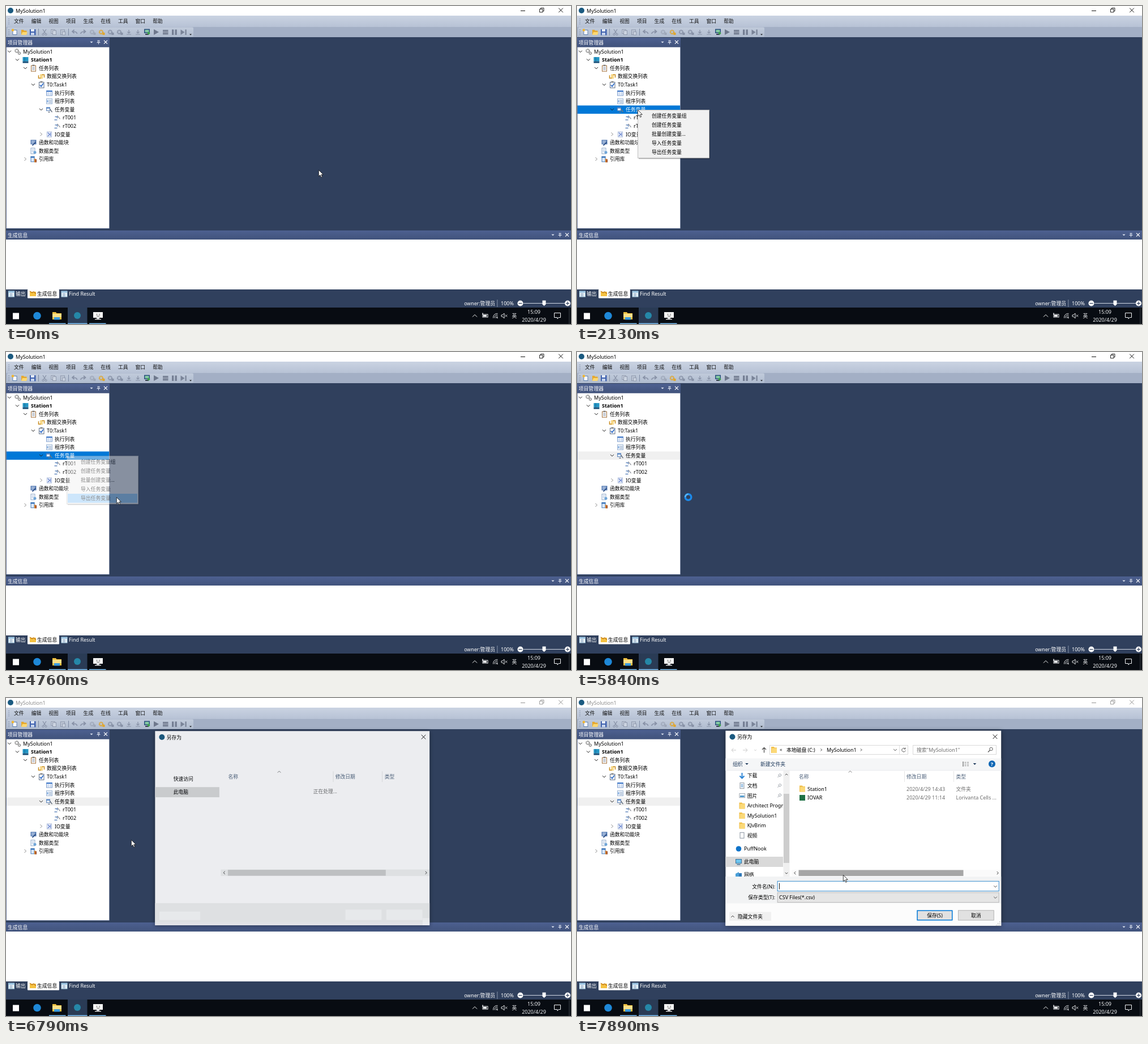
An HTML page for the animation above (7990 ms loop, 998 by 561 pixels).

```html
<!DOCTYPE html>
<html lang="zh-CN">
<head>
<meta charset="utf-8">
<title>MySolution1</title>
<style>
html, body { margin: 0; width: 100%; height: 100%; overflow: hidden; background: #30405d; }
svg { display: block; width: 100%; height: 100%; }
text { font-family: "Noto Sans", "Open Sans", "Noto Sans CJK SC", "Noto Sans CJK", sans-serif; white-space: pre; }
</style>
</head>
<body>
<svg id="stage" viewBox="0 0 998 561" preserveAspectRatio="none"></svg>
<script>
const LOOP = 7990;

// Drawing helpers
const R = (x, y, w, h, fill, more = '') =>
  `<rect x="${x}" y="${y}" width="${w}" height="${h}" fill="${fill}" ${more}/>`;
const box = (x, y, w, h, fill, line, sw = 1) =>
  R(x + sw / 2, y + sw / 2, w - sw, h - sw, fill, `stroke="${line}" stroke-width="${sw}"`);
const C = (x, y, r, fill, more = '') => `<circle cx="${x}" cy="${y}" r="${r}" fill="${fill}" ${more}/>`;
const P = (d, stroke = '#333', w = 1, fill = 'none') =>
  `<path d="${d}" stroke="${stroke}" stroke-width="${w}" fill="${fill}"/>`;
const F = (d, fill) => `<path d="${d}" fill="${fill}"/>`;
const T = (x, y, s, fill = '#000', more = '') =>
  `<text x="${x}" y="${y + 3.3}" font-size="${/^[ -~]+$/.test(s) ? 9 : 8.8}" fill="${fill}" ${more}>${s}</text>`;
const G = (id, body, more = '') => `<g id="${id}" ${more}>${body}</g>`;
const mid = 'text-anchor="middle"', end = 'text-anchor="end"';

const chevron = {
  down: (x, y, c = '#333', s = 3) => P(`M${x - s} ${y - s / 2}l${s} ${s} ${s} ${-s}`, c),
  up: (x, y, c = '#333', s = 3) => P(`M${x - s} ${y + s / 2}l${s} ${-s} ${s} ${s}`, c),
  right: (x, y, c = '#333', s = 3) => P(`M${x - s / 2} ${y - s}l${s} ${s} ${-s} ${s}`, c),
  left: (x, y, c = '#333', s = 3) => P(`M${x + s / 2} ${y - s}l${-s} ${s} ${s} ${s}`, c)
};
const cross = (x, y, s, c, w = 1) =>
  P(`M${x - s} ${y - s}l${2 * s} ${2 * s}M${x + s} ${y - s}l${-2 * s} ${2 * s}`, c, w);
const caretDown = (x, y, c, s = 3) => F(`M${x - s} ${y - s / 2}h${2 * s}l${-s} ${s}z`, c);
const folder = (x, y) => F(`M${x - 5} ${y - 5.5}h5l1 1.5h4v9.5h-10z`, '#f0c04c') +
  R(x - 4, y - 3, 9, 8.5, '#fbd978');
const page = (x, y, c = '#8a94a0') => box(x - 4, y - 5.5, 8, 11, '#fff', c);
const lines = (x, y, w, n, c) => Array.from({ length: n }, (_, i) => R(x, y + i * 2, w, .9, c)).join('');
const pushpin = (x, y, c) => P(`M${x - 2} ${y - 3}h4M${x - 1} ${y - 3}v3.5M${x + 1.2} ${y - 3}v3.5M${x - 3} ${y + .5}h6M${x} ${y + .5}v3`, c, .9);

// Small icons, each around its centre
const icon = {
  gears: (x, y) => C(x - 1.5, y - 1.5, 2.8, 'none', 'stroke="#888" stroke-width="2" stroke-dasharray="1.6 .6"') +
    C(x + 3, y + 2.8, 2, 'none', 'stroke="#777" stroke-width="1.6" stroke-dasharray="1.4 .5"'),
  station: (x, y) => R(x - 5, y - 5, 10, 7.5, '#2496c4') + R(x - 5, y + 2.5, 10, 3, '#174f78') + R(x - 2, y - 5, 1, 8, '#176a9a'),
  list: (x, y) => box(x - 4.5, y - 5, 9, 11, '#fff', '#a4713c') + R(x - 2, y - 6, 4, 2, '#777') + lines(x - 2.5, y - 2, 5, 3, '#8a96a8'),
  swap: (x, y) => R(x - 2.5, y - 4, 5, 8, '#f7d98a') + P(`M${x - 5} ${y - 2}v5h4M${x + 5} ${y + 2}v-5h-4`, '#c98d1f', 1.5),
  task: (x, y) => box(x - 4.5, y - 5, 9.5, 11, '#fff', '#5d6d86') + R(x - 2, y - 6, 4, 2, '#777') + P(`M${x - 2.5} ${y + .5}l2 2.5 4-5.5`, '#1d5fc4', 1.6),
  table: (x, y) => box(x - 5.5, y - 4.5, 11, 9.5, '#f4f8ff', '#7c9ccc') + R(x - 5, y - 4.5, 10, 2.5, '#4a80cc') + P(`M${x - 2} ${y - 2}v6.5M${x + 2} ${y - 2}v6.5M${x - 5} ${y + 1.5}h10`, '#a9bfe0', .7),
  form: (x, y) => box(x - 5.5, y - 5, 11, 10, '#f1f6fd', '#9db4d2') + lines(x - 1, y - 2, 5, 3, '#8fa5c2') + R(x - 4, y - 2, 2, 4, '#7ca8de'),
  vars: (x, y) => box(x - 5.5, y - 4, 7, 6.5, '#e3eefb', '#5f83b5') + R(x - 5.5, y - 4, 7, 2, '#4f7fc0') + P(`M${x - 2} ${y + 4.5}h3M${x + 1} ${y - 1}l4 5.5`, '#6e7784', 1.5),
  tool: (x, y) => P(`M${x - 4} ${y - 2}h4v3M${x - 5} ${y + 3.5}h5`, '#4a76b4', 1.2) + P(`M${x} ${y - 4}l5 6`, '#8b8f98', 1.3),
  io: (x, y) => box(x - 4.5, y - 5, 9, 10, '#f3f6ff', '#a7b8d8') + P(`M${x - 2.5} ${y - 3}l3 3-3 3M${x + 2} ${y - 3}v6`, '#4e6fc2', 1.1),
  func: (x, y) => R(x - 5, y - 5, 10, 8, '#5a7fb5') + lines(x - 3.5, y - 3.5, 6, 3, '#dfe9f7') + P(`M${x - 2} ${y + 5}l6-6`, '#2d4f86', 1.8),
  type: (x, y) => page(x - 1, y, '#8fa9c9') + lines(x - 3, y - 3, 4, 3, '#a5bedd') + C(x + 2.5, y + 2.5, 2.5, '#6fa5d8'),
  lib: (x, y) => box(x - 5, y - 5, 7, 10, '#dceafa', '#4d7db8') + R(x - 5, y - 5, 7, 2.5, '#3f78bb') + R(x + 1.5, y - 1, 2, 6.5, '#d9822b') + R(x + 3.5, y, 2, 5.5, '#9d4a26'),
  result: (x, y) => box(x - 5.5, y - 5.5, 11, 11, '#eef6fb', '#a9d0e6') + R(x - 4.5, y - 4.5, 9, 2, '#7fb2d8') + lines(x - 3, y - 1, 5, 3, '#7b97b8')
};

function titleBar() {
  return R(0, 0, 998, 17, '#fff') + C(8, 8, 5, '#1b5a80') +
    G('title', T(17, 8.5, 'MySolution1') + P('M909 8.5h8', '#111') +
      P('M942.5 5.5h5.5v5.5h-5.5zM944.5 5.5v-2h5.5v5.5h-2', '#111', .9) + cross(980, 7.5, 3.8, '#111'));
}

function menuBar() {
  const names = ['文件', '编辑', '视图', '项目', '生成', '在线', '工具', '窗口', '帮助'];
  return R(0, 17, 998, 20, 'url(#bar)') + [0, 1, 2, 3].map(i => R(4.5, 22 + i * 3, 1.2, 1.2, '#7784a0')).join('') +
    names.map((s, i) => T(14 + i * 30.65, 27, s, '#111')).join('');
}

function toolBar() {
  const g = '#8791a6', y = 46;
  const play = x => F(`M${x - 4} ${y - 5}v10l9-5z`, '#6e788c');
  const gear = (x, c) => C(x - 1, y, 3, 'none', `stroke="${c}" stroke-width="2.4" stroke-dasharray="1.8 .7"`) + R(x + 1.5, y + 1, 4, 4, c);
  const arrow = x => P(`M${x} ${y - 4}v6m-2.5-2.5l2.5 2.5 2.5-2.5M${x - 4} ${y + 4}h8`, g, 1.2);
  return R(0, 37, 998, 18, '#a3afc5') + R(2, 37.5, 329, 17, 'url(#strip)', 'rx="2"') +
    [0, 1, 2, 3].map(i => R(4.5, 41 + i * 3, 1.2, 1.2, '#68758f')).join('') +
    box(11.5, 42, 8, 9, '#fff', '#5e7fae') + C(12, 42.5, 2.2, '#f2b52d') +
    F('M27 42h4l1 1.5h4.5v7h-9.5z', '#e6a92e') + F('M29 46h9l-2 5h-9z', '#fbd873') +
    R(42, 41, 10.5, 10.5, '#3f61ad') + R(44, 41, 6, 4, '#e6eefb') + R(44, 47, 6, 4.5, '#c5d3ec') +
    [57, 110].map(x => R(x, 40, 1, 12, '#7c89a3')).join('') +
    P('M65 41l5 8M71 41l-5 8', g, 1.2) + C(65.5, 50, 1.6, 'none', `stroke="${g}"`) + C(70.5, 50, 1.6, 'none', `stroke="${g}"`) +
    box(79.5, 41, 7, 8, '#c6cedc', g, .8) + box(82, 43, 7, 8, '#ccd4e1', g, .8) +
    box(96, 41.5, 8, 9.5, '#bac3d3', g, .8) + box(99.5, 45, 5.5, 6.5, '#ccd4e1', g, .8) +
    P('M125.5 49q0-4-8-4m3-3l-3.5 3 3.5 3', g, 1.7) + P('M132 49q0-4 8-4m-3-3l3.5 3-3.5 3', g, 1.7) +
    gear(153, '#9ea7b8') + gear(169, '#e0a62b') + gear(185, g) + gear(201, g) + arrow(217) + arrow(233) +
    R(244, 40.5, 10, 7.5, '#2b4e7e') + R(245.5, 42, 7, 4.5, '#83c9a2') + R(246, 49, 6, 2, '#333c4c') + C(252, 48, 2.3, '#3fa04f') +
    play(265) + R(277, 42, 9.5, 8.5, '#7a8498') + R(277, 45.5, 9.5, 1, '#a9b3c4') +
    R(293, 41.5, 3.3, 9.5, '#747e93') + R(298.5, 41.5, 3.3, 9.5, '#747e93') +
    F('M308.5 41.5v9.5l7-4.75z', '#7a8498') + R(316.5, 41.5, 2.2, 9.5, '#7a8498') + caretDown(326, 50.5, '#111', 2);
}

const rows = [
  [30, 'MySolution1', 'gears', 'down'], [44, 'Station1', 'station', 'down'], [58, '任务列表', 'list', 'down'],
  [72, '数据交换列表', 'swap'], [72, 'T0:Task1', 'task', 'down'], [86, '执行列表', 'table'], [86, '程序列表', 'form'],
  [86, '任务变量', 'vars', 'down'], [100, 'rT001', 'tool'], [100, 'rT002', 'tool'], [86, 'IO变量', 'io', 'right'],
  [58, '函数和功能块', 'func'], [58, '数据类型', 'type'], [58, '引用库', 'lib', 'right']
];

function paneHead(y, w, s) {
  return R(0, y, w, 16, 'url(#head)') + T(3, y + 8.3, s, '#fff') +
    caretDown(w - 32, y + 8, '#e6ebf5', 2.6) + pushpin(w - 19.5, y + 8, '#e6ebf5') + cross(w - 7, y + 7.7, 3, '#fff', 1.2);
}

function projectTree() {
  return paneHead(56, 183, '项目管理器') + R(0, 72, 183, 321, '#41537c') + R(.8, 72.7, 181.5, 319.5, '#fff') +
    G('row', R(1, 175.5, 181, 14.6, '#0078d7')) +
    rows.map(([x, s, kind, fold], i) => {
      const y = 80.2 + i * 14.6;
      const more = i === 1 ? 'font-weight="700"' : i === 7 ? 'id="rowText"' : '';
      return (fold ? chevron[fold](x - 24, y, fold === 'down' ? '#222' : '#888') : '') +
        icon[kind](x - 9.5, y + .3) + T(x, y + .1, s, '#000', more);
    }).join('');
}

function lowerPane() {
  return paneHead(396, 998, '生成信息') + R(0, 412, 998, 88, '#fff') + R(0, 500, 998, 32, '#30405d') +
    icon.result(9.5, 508) + T(17, 507.7, '输出', '#fff') + R(38, 500, 56, 15.5, '#fff', 'rx="1"') +
    R(42, 504, 11, 8, '#f5c242') + P('M42 503l4 3 3-2 4 4', '#c17a1d', 1.2) + T(55, 507.7, '生成信息') +
    icon.result(103, 508) + T(111, 507.7, 'Find Result', '#fff') +
    T(864, 525, 'owner:管理员', '#fff', end) + R(867.5, 518, .8, 13, '#9aa6ba') + T(874, 525, '100%', '#fff') +
    R(914, 524, 73, 1, '#cfd6e2') + F('M947.5 519.5h6v7l-3 2.5-3-2.5z', '#fff') +
    C(908.5, 524.5, 5, '#fff') + R(905.5, 524, 6, 1.2, '#30405d') + C(992, 524.5, 5, '#fff') +
    R(989, 524, 6, 1.2, '#30405d') + R(991.4, 521.5, 1.2, 6, '#30405d');
}

function taskBar() {
  const w = '#f2f4f6';
  return R(0, 532, 998, 29, '#080c12') + R(12, 541.5, 11, 11, '#fff') + C(55, 546.5, 6.8, '#1e88d8') +
    F('M82 540h6l1.5 2h8.5v11h-16z', '#f0c040') + R(82, 543, 16, 6, '#fbe08a') + R(85, 549, 10, 4.5, '#3b9be0') +
    R(109, 532, 34.5, 29, '#2a3b55', 'id="appTab"') + C(126, 546, 6, '#2588a8') +
    R(154, 540, 17, 10, '#f4f4f4') + R(160, 550, 5, 2, '#c9cdd2') + R(157, 552, 11, 1.3, '#e5e5e5') +
    C(160.5, 544, .8, '#333') + C(165, 544, .8, '#333') + P('M160 546.5q2.7 2 5.5 0', '#333', .8) +
    [76, 109, 147].map(x => R(x, 559.5, x === 109 ? 34.5 : 29.5, 1.5, '#76b9ed')).join('') +
    chevron.up(828, 546.5, w, 4) +
    box(841.5, 543.5, 10, 6, 'none', w) + R(843, 545, 6, 3, w) + P('M842 541.5v3', w, 1.4) +
    P('M860.5 550.5q0-8 8-8M863 550.5q0-5.5 5.5-5.5M865.5 550.5q0-3 3-3', w, .9) + C(867.8, 550, 1, w) +
    P('M875 545h2l3-3v9l-3-3h-2z', w, .9) + cross(883.5, 546.5, 1.8, w, .9) + T(898, 546.5, '英', w, mid) +
    T(932.5, 539.5, '15:09', w, mid) + T(932.5, 553.3, '2020/4/29', w, mid) +
    P('M968.5 541.5h11v8h-3.5l-2 2.5v-2.5h-5.5z', w) + R(994.5, 533, .8, 28, '#4a4f57');
}

function contextMenu() {
  const names = ['创建任务变量组', '创建任务变量', '批量创建变量...', '导入任务变量', '导出任务变量'];
  return G('menu', R(109, 186, 126, 84, '#000', 'opacity=".28"') + box(107, 183, 127, 85.5, '#f1f1f1', '#b4b4b4', .8) +
    R(109, 250, 123, 16, '#91c9f7', 'id="hover"') +
    names.map((s, i) => T(132, 193.5 + i * 16, s)).join(''));
}

function dialogTree() {
  const items = [['下载', 137], ['文档', 154.7], ['图片', 172.2], ['Architect Progr', 189.9], ['MySolution1', 207.4], ['KJvBrim', 224.9], ['视频', 242.3]];
  const art = y => [
    P(`M291.5 ${y - 5}v9m-4-3.5l4 4 4-4`, '#2f86d6', 2),
    page(291.5, y) + lines(289.5, y - 2.5, 4, 3, '#3d87c9'),
    box(286.5, y - 4, 10.5, 8, '#fff', '#8a94a0', .8) + R(288, y, 7.5, 2.5, '#3d8fc9')
  ];
  const pin = y => P(`M354.5 ${y + 3}l2.5-2.5m-1.5-2l3.5 3.5m-2.5-3.5l2-2 2.5 2.5-2 2`, '#7d858f', .9);
  return `<g clip-path="url(#treeClip)">` + items.map(([s, y], i) =>
    (i < 3 ? art(y)[i] + pin(y) : i < 6 ? folder(291.5, y) : page(291.5, y)) + T(300.7, y, s)).join('') +
    C(285.5, 266, 4.8, '#0f73c9') + T(295, 265.9, 'PuffNook') +
    R(262, 280, 102, 18, '#d9d9d9') + box(280, 284, 11, 8, '#6cc5ef', '#3a6f98') + R(282.5, 293, 6, 1.5, '#3a6f98') + T(295, 289, '此电脑') +
    F('M280 310l6-3v8h-6z', '#4a9fd8') + R(286, 309, 5, 6, '#2f78b8') + T(295, 312, '网络') + '</g>' +
    R(364.5, 128, 11, 187, '#f0f0f0') + R(365, 169, 10, 122, '#cdcdcd') +
    chevron.up(370, 135, '#444', 2.3) + chevron.down(370, 309, '#444', 2.3);
}

function dialog() {
  const head = '#4c607a', dim = '#6d6d6d', ink = '#1e395b', left = 262.4, width = 486.8;
  const frame = R(left, 57.7, width, 344, '#fff', 'style="filter:drop-shadow(0 1px 4px #0007)"') +
    C(274.5, 68.5, 5, '#1b5a80') + T(283, 68.7, '另存为') + cross(738.5, 68.2, 3.8, '#111') +
    chevron.up(482.5, 130, '#777', 2.8) + T(392, 138.3, '名称', head) + T(582, 138.3, '修改日期', head) + T(669.5, 138.3, '类型', head) +
    [578, 665].map(x => R(x, 129, .8, 19, '#dedede')).join('') +
    R(379, 303, 370, 11.5, '#f0f0f0', 'id="track"') + R(391.5, 303.5, 280, 10.5, '#cdcdcd', 'id="thumb"') +
    chevron.left(385, 308.7, '#333', 2.5) + chevron.right(743, 308.7, '#333', 2.5);
  const bare = T(295, 142, '快速访问') + R(left, 157, 114, 18, '#d9d9d9') + T(295, 165.7, '此电脑') +
    R(left, 362.5, width, 39.2, '#f0f0f0') + R(270, 377.5, 72.5, 15, '#fafafa') +
    R(600, 374, 64, 18.5, '#fafafa') + R(672.5, 374, 64, 18.5, '#fafafa') + R(737, 389, 12, 12.7, '#fafafa');
  const nav = P('M281 92h-8m3.5-3.5l-3.5 3.5 3.5 3.5M293 92h8m-3.5-3.5l3.5 3.5-3.5 3.5', '#c9c9c9') +
    chevron.down(315, 92, '#ccc', 1.8) + P('M330.5 96.5v-9m-3.5 3.5l3.5-3.5 3.5 3.5', '#444', 1.2) +
    box(340, 83, 245, 17, '#fff', '#d9d9d9') + folder(348, 91.5) + T(358, 91, '«', '#333') + T(370, 91.3, '本地磁盘 (C:)') +
    chevron.right(431.5, 91.5, '#333', 2) + T(441, 91.3, 'MySolution1') + chevron.right(502, 91.5, '#333', 2) +
    chevron.down(562, 91.5, '#555', 2.8) + R(569, 83, .8, 17, '#d9d9d9') +
    P('M579.5 89.5a3.3 3.3 0 1 0 .8 3M580 87.5v2.5h-2.5', '#555') +
    box(593, 83, 148, 17, '#fff', '#d9d9d9') + T(600, 91.3, '搜索"MySolution1"', dim) +
    C(731.5, 90, 2.7, 'none', 'stroke="#555"') + P('M729.5 92l-3.5 3.5', '#555', 1.2) +
    R(left, 106.5, width, 21.5, '#f5f6f7') + R(left, 127.5, width, .7, '#e4e6e9') + T(275, 116.5, '组织', ink) + caretDown(300, 116.5, ink, 2.8) +
    T(324, 116.5, '新建文件夹', ink) +
    [0, 1, 2].map(i => R(681, 112.5 + i * 3, 2, 2, '#777') + R(684.5, 113 + i * 3, 3, .9, '#777') + R(689, 113 + i * 3, 3, .9, '#777')).join('') +
    caretDown(702.5, 116.5, ink, 2.8) + C(733, 116.3, 6, '#0f67b5') + T(733, 116.5, '?', '#fff', mid + ' font-weight="700"');
  const form = R(left, 315, width, 47.5, '#f2f3f4') + R(left, 362.5, width, 39.2, '#fcfcfc') +
    T(350, 332.3, '文件名(N):', '#000', end) + box(353.7, 322.8, 392, 18.3, '#fff', '#1f7fc8', .9) + R(357, 326.5, .9, 11, '#000') + chevron.down(739, 332.5, '#555', 2.8) +
    T(350, 352, '保存类型(T):', '#000', end) + box(353.7, 342.8, 392, 18.3, '#e5e5e5', '#b3b3b3', .9) + T(357, 352, 'CSV Files(*.csv)') + chevron.down(739, 352, '#555', 2.8) +
    R(269, 377.5, 74, 15.5, '#f0f0f0') + chevron.up(275, 385.5, '#333', 2.7) + T(284, 385.5, '隐藏文件夹') +
    box(600.3, 374.3, 63.2, 18.2, '#e1e1e1', '#0078d7', 1.5) + T(632, 383.3, '保存(S)', '#000', mid) +
    box(673, 374.3, 63.7, 18.2, '#e1e1e1', '#adadad', .9) + T(704.7, 383.3, '取消', '#000', mid) +
    [[746, 394], [743, 397], [746, 397], [740, 400], [743, 400], [746, 400]].map(([x, y]) => R(x, y, 1.4, 1.4, '#b5b5b5')).join('');
  const file = (y, name, date, kind) => T(407, y, name) + T(582, y, date, dim) + T(669.5, y, kind, dim);
  const files = folder(398, 160) + file(160.3, 'Station1', '2020/4/29 14:43', '文件夹') +
    R(393, 171, 10, 10, '#1e7145') + file(175.8, 'IOVAR', '2020/4/29 11:14', 'Lorivanta Cells ...');
  return G('dialog', frame + G('bare', bare) + G('full', nav + dialogTree() + form) +
    G('wait', T(543, 165, '正在处理...', dim)) + G('files', files));
}

const grad = (id, a, b) => `<linearGradient id="${id}" x2="0" y2="1"><stop stop-color="${a}"/><stop offset="1" stop-color="${b}"/></linearGradient>`;
const stage = document.getElementById('stage');
stage.innerHTML = '<defs>' + grad('bar', '#cad3e2', '#b7c2d5') + grad('strip', '#c1cbdb', '#b0bccf') + grad('head', '#4d6090', '#41537c') +
  '<clipPath id="treeClip"><rect x="262.4" y="128" width="101.6" height="187"/></clipPath></defs>' +
  R(0, 0, 998, 561, '#30405d') + titleBar() + menuBar() + toolBar() + projectTree() + lowerPane() + taskBar() +
  contextMenu() + dialog() +
  G('ring', C(0, 0, 5.3, 'none', 'stroke="#1c8aea" stroke-width="3.4"') + P('M-5.3 0A5.3 5.3 0 0 1 0-5.3', '#5cb6f7', 2.4)) +
  G('arrow', P('M.3.3v11.2l2.6-2.4 1.8 4.1 1.9-.8-1.8-4h3.5z', '#111', .8, '#fff'));

const el = Object.fromEntries([...stage.querySelectorAll('[id]')].map(e => [e.id, e]));

// Pointer path: [time, x, y], each held until the next
const path = [[0, 552, 289]];
function move(t0, t1, n, x, y) {
  const [, x0, y0] = path[path.length - 1];
  for (let k = 0; k < n; k++) {
    const p = (k + 1) / n, e = p * p * (3 - 2 * p);
    path.push([t0 + (t1 - t0) * k / (n - 1), x0 + (x - x0) * e, y0 + (y - y0) * e]);
  }
}
move(580, 960, 6, 175, 193);
move(1130, 1510, 6, 107, 183);
move(2970, 3460, 7, 195, 261);
move(3610, 3670, 2, 195, 256);
path.push([5920, 204, 265]);
move(6000, 6300, 4, 221, 250);
move(6880, 6980, 2, 440, 296);
move(7430, 7890, 6, 470, 312);

// Stepped values: [time, value...]
const rowFill = [[0, 'none'], [1970, '#0078d7'], [4950, '#f0f0f0']];
const menuFade = [[0, 0], [2050, .5], [2130, 1], [4760, .45], [4860, 0]];
const dialogPose = [[0, 0, 1], [6630, .3, .965], [6700, .7, .986], [6790, .91, .996], [6880, 1, 1]];
const at = (steps, t) => steps.filter(s => s[0] <= t + .5).pop();
const show = (e, on) => e.setAttribute('display', on ? 'inline' : 'none');

function draw(t) {
  const [, x, y] = at(path, t), [, fill] = at(rowFill, t), [, fade] = at(menuFade, t), [, alpha, scale] = at(dialogPose, t);
  const busy = t >= 5050 && t < 6000, loaded = t >= 7150;
  el.appTab.setAttribute('fill', t < 70 ? '#2e415d' : '#2a3b55');
  el.title.setAttribute('opacity', t < 5920 ? 1 : .45);
  el.row.firstChild.setAttribute('fill', fill);
  el.rowText.setAttribute('fill', fill === '#0078d7' ? '#fff' : '#000');

  show(el.menu, fade > 0);
  el.menu.setAttribute('opacity', fade);
  const item = Math.floor((y - 185) / 16);
  show(el.hover, item >= 0 && t > 2900);
  el.hover.setAttribute('y', 186 + Math.min(item, 4) * 16);

  show(el.dialog, alpha > 0);
  el.dialog.setAttribute('opacity', alpha);
  el.dialog.setAttribute('transform', `translate(492 204) scale(${scale}) translate(-492 -204)`);
  show(el.bare, !loaded);
  show(el.full, loaded);
  show(el.wait, t < 7240);
  show(el.files, t >= 7240);
  el.track.setAttribute('fill', loaded ? '#fafafa' : '#f0f0f0');
  el.thumb.setAttribute('width', loaded ? 291 : 280);
  el.thumb.setAttribute('fill', t >= 7430 && y > 303 ? '#a6a6a6' : '#cdcdcd');

  show(el.ring, busy);
  show(el.arrow, !busy);
  el.ring.setAttribute('transform', `translate(${x + 1.5} ${y})`);
  el.arrow.setAttribute('transform', `translate(${x} ${y})`);
}

const start = performance.now();
function tick() {
  draw((performance.now() - start) % LOOP);
  requestAnimationFrame(tick);
}
tick();
</script>
</body>
</html>
```
